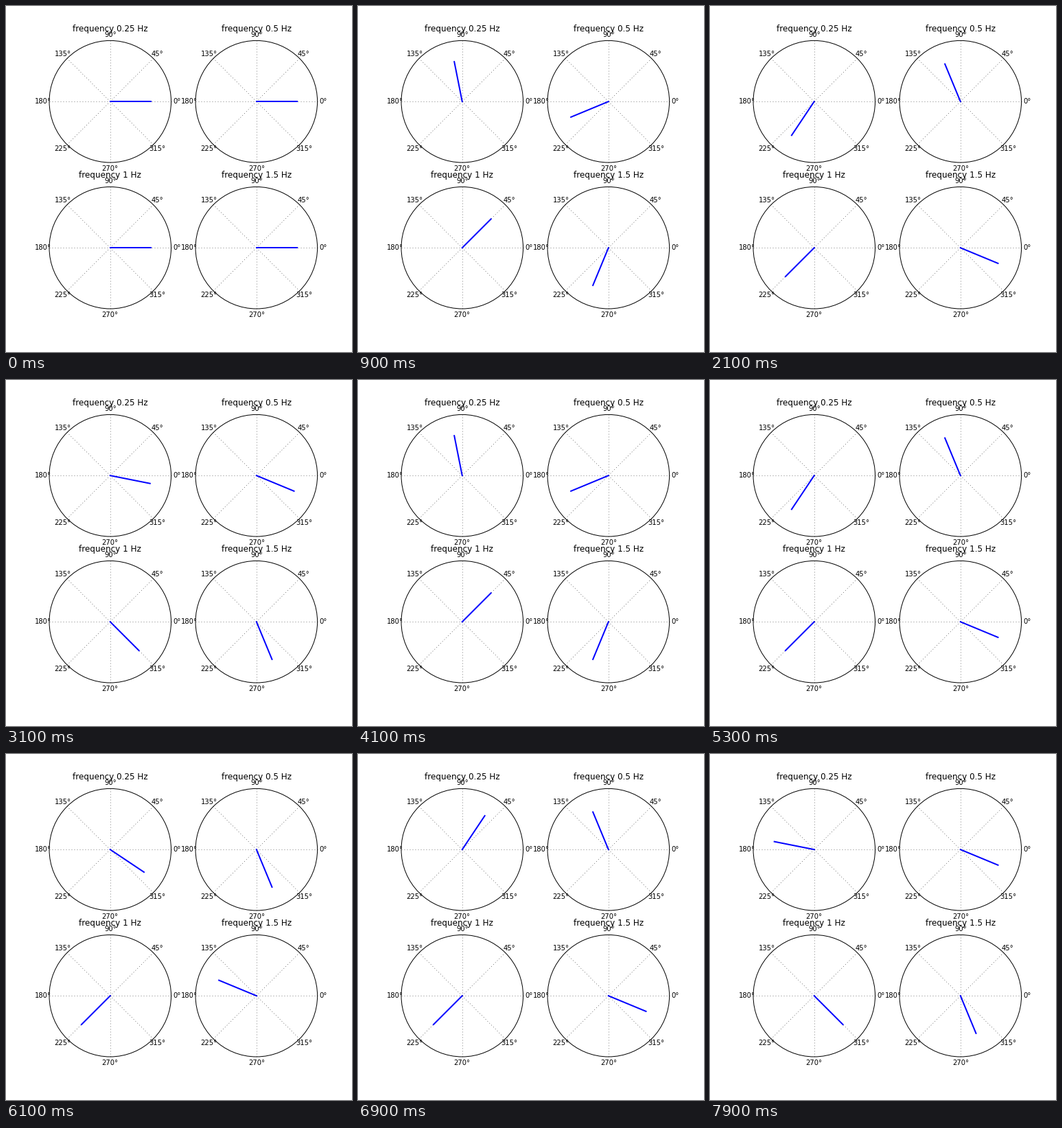
These frames come from a looping animation (504 px wide and 504 px high, 8 s). A matplotlib script:

```python
import numpy as np
import matplotlib.pyplot as plt
from matplotlib.animation import FuncAnimation
from matplotlib.patches import Circle

SIZE = 504
FRAMES = 80
INTERVAL = 100                      # ms
RADIUS = 0.775 * SIZE / 2.2 / 2     # two dials with a 20% gap
NEAR = 0.125 * SIZE + RADIUS
FAR = 0.9 * SIZE - RADIUS
ARM = RADIUS / 1.5
DEGREES_PER_HZ = 45                 # rotation per frame at 1 Hz

plt.rcParams["font.family"] = "DejaVu Sans"
plt.rcParams["lines.scale_dashes"] = False

fig = plt.figure(figsize=(SIZE / 72, SIZE / 72), dpi=72, facecolor="white")
ax = fig.add_axes([0, 0, 1, 1])
ax.set(xlim=(0, SIZE), ylim=(0, SIZE))
ax.axis("off")


def polar(cx, cy, r, degrees):
    a = np.radians(degrees)
    return cx + r * np.cos(a), cy + r * np.sin(a)


def draw_dial(cx, cy, title):
    """Draw the static dial and return its rotating arm."""
    for deg in range(0, 360, 45):
        x, y = polar(cx, cy, RADIUS, deg)
        ax.plot([cx, x], [cy, y], color="black", lw=0.5,
                linestyle=(0, (1, 3)), zorder=1)
        x, y = polar(cx, cy, 1.1 * RADIUS, deg)
        ax.text(x, y, f"{deg}°", size=10, ha="center", va="center", zorder=4)
    ax.add_patch(Circle((cx, cy), RADIUS, fill=False, ec="black", lw=1, zorder=3))
    ax.text(cx, cy + 1.1 * RADIUS + 5, title, size=12,
            ha="center", va="baseline", zorder=4)
    arm, = ax.plot([], [], color="blue", lw=2,
                   solid_capstyle="projecting", zorder=2)
    return arm


dials = [(freq, cx, cy, draw_dial(cx, cy, f"frequency {freq} Hz"))
         for freq, cx, cy in [(0.25, NEAR, FAR), (0.5, FAR, FAR),
                              (1, NEAR, NEAR), (1.5, FAR, NEAR)]]


def update(frame):
    for freq, cx, cy, arm in dials:
        x, y = polar(cx, cy, ARM, frame * freq * DEGREES_PER_HZ % 360)
        arm.set_data([cx, x], [cy, y])
    return [dial[-1] for dial in dials]


anim = FuncAnimation(fig, update, frames=FRAMES, interval=INTERVAL,
                     repeat=True, repeat_delay=0)
plt.show()
```
